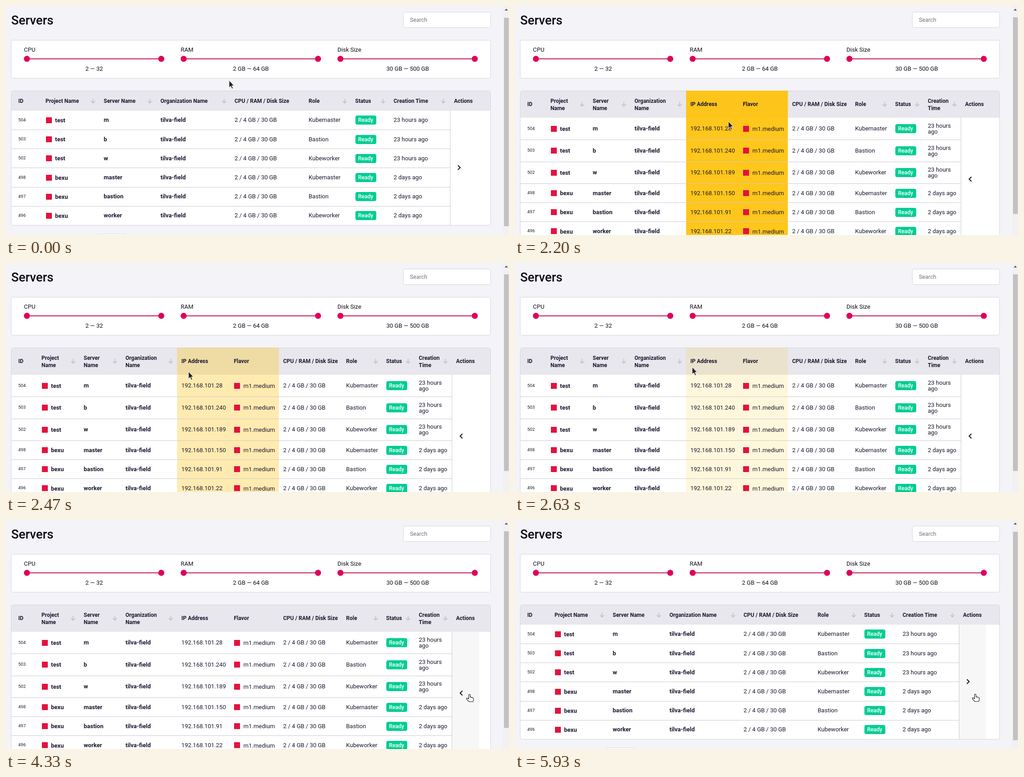
Write an HTML page that moves like this. It is 1107 px wide and 506 px high and loops after 6.26 s.

```html
<!DOCTYPE html>
<html lang="en">
<head>
<meta charset="utf-8">
<title>Servers</title>
<style>
html, body { margin: 0; width: 100%; height: 100%; overflow: hidden; background: #f3f3f8; }
svg { display: block; font: 13px Roboto, sans-serif; fill: #1c1730; }
.b { font-weight: 700; }
.h { font-weight: 700; font-size: 12px; }
.id { font-size: 9.75px; }
.pill { font-weight: 500; font-size: 12px; fill: #fff; }
.title { font-weight: 500; font-size: 27.4px; fill: #0b0812; }
.label { fill: #100d18; }
.search { font-size: 12.4px; fill: #74747c; }
</style>
</head>
<body>
<svg id="stage" width="1107" height="506" viewBox="0 0 1107 506"></svg>
<script>
const LOOP = 6260, OPEN = 1600, CLOSE = 4900;
const EDGE = "#d5d5de", RULE = "#cbcbd3", PINK = "#e0005b";

const rect = (x, y, w, h, fill, extra = "") =>
  `<rect x="${x}" y="${y}" width="${w}" height="${h}" fill="${fill}" ${extra}/>`;
const box = (x, y, w, h, fill = "#fff") => rect(x, y, w, h, fill, `rx="4" stroke="${EDGE}"`);
const path = (d, stroke, width = 1) =>
  `<path d="${d}" fill="none" stroke="${stroke}" stroke-width="${width}"/>`;
// Baselines sit on whole pixels to keep the glyphs crisp
const text = (x, y, s, cls = "", extra = "") =>
  `<text x="${x - .5}" y="${Math.round(y)}" class="${cls}" ${extra}>${s}</text>`;
const icon = (x, y) => rect(Math.round(x), Math.round(y - 6.5), 13, 13, "#e3123f");

const servers = [
  [504, "test", "m", "Kubemaster", "23 hours ago", 28],
  [503, "test", "b", "Bastion", "23 hours ago", 240],
  [502, "test", "w", "Kubeworker", "23 hours ago", 189],
  [498, "bexu", "master", "Kubemaster", "2 days ago", 150],
  [497, "bexu", "bastion", "Bastion", "2 days ago", 91],
  [496, "bexu", "worker", "Kubeworker", "2 days ago", 22],
];

function slider(x, name, range) {
  const dot = cx => `<circle cx="${cx}" cy="116.8" r="6.7" fill="${PINK}"/>`;
  return text(x, 101, name, "label") + path(`M${x + 6} 116.7h296`, "#c5124f", 2) +
    dot(x + 6) + dot(x + 301.7) + text(x + 154.5, 143, range, "label", 'text-anchor="middle"');
}

// Column x positions plus header and row geometry for both table states
const narrow = {
  rows: [231.3, 273.5, 315.7, 357.9, 400.1, 442.3, 484.5], headY: 210, rule: 977, chevron: [997, 357, 1],
  x: { ID: 27.5, "Project Name": 87.5, "Server Name": 215.5, "Organization Name": 340.5,
    "CPU / RAM / Disk Size": 503.5, Role: 666.5, Status: 769, "Creation Time": 853.5, Actions: 986.5 },
  arrows: [191.5, 316.5, 480, 745.5, 830, 962.5],
};
const wide = {
  rows: [247, 295.5, 344, 392.5, 434.7, 476.9, 519], headY: 217, rule: 981.5, chevron: [1002, 382.5, -1],
  x: { ID: 27.5, "Project Name": 78.5, "Server Name": 171.5, "Organization Name": 263.5,
    "IP Address": 386.5, Flavor: 502, "CPU / RAM / Disk Size": 610.5, Role: 749, Status: 837,
    "Creation Time": 909, Actions: 991 },
  arrows: [147.5, 239.5, 362.5, 813.5, 885, 967],
};

function table(t, id) {
  const { rows, x, headY, rule } = t, isWide = t === wide, bottom = rows[6];
  let s = box(11.5, 187.5, 1055, bottom - 187.5) +
    `<path d="M12 ${rows[0]}V192a4 4 0 0 1 4-4H1062a4 4 0 0 1 4 4V${rows[0]}z" fill="#e7e7ed"/>` +
    rect(rule, rows[0], 59.5, bottom - rows[0] - .5, "#f7f7f7", `id="${id}Hover"`);
  if (isWide) s += rect(376.5, 187, 224, 319, "#ffc107", 'id="glow"');
  for (const y of rows.slice(1, 6)) s += path(`M12 ${Math.floor(y) + .5}H${rule}`, RULE);
  s += path(`M${Math.floor(rule) + .5} ${rows[0]}V${bottom}`, RULE);

  for (const name in x) {
    const cut = name.endsWith("Name") || name.endsWith("Time") ? name.split(" ") : [];
    s += isWide && cut.length
      ? text(x[name], 214, cut[0], "h") + text(x[name], 230, cut[1], "h")
      : text(x[name], headY + 4, name, "h");
  }
  for (const a of t.arrows)
    s += path(`M${a} ${headY - 5}v9.5m-4.5-4.5l4.5 4.5l4.5-4.5`, "#bcbcc6", 1.5);

  servers.forEach(([num, project, server, role, age, ip], i) => {
    const c = (rows[i] + rows[i + 1]) / 2, y = c + 4;
    const px = x["Project Name"], sx = x.Status, ax = x["Creation Time"];
    s += text(x.ID, c + 2.5, num, "id") + icon(px, c) + text(px + 21, y + .6, project, "b") +
      text(x["Server Name"], y, server, "b") +
      text(x["Organization Name"], y, "tilva-field", "b") +
      text(x["CPU / RAM / Disk Size"], y, "2 / 4 GB / 30 GB") + text(x.Role, y, role) +
      rect(sx, Math.round(c - 10), 46, 20, "#00cd93", 'rx="4"') + text(sx + 6.5, y, "Ready", "pill");
    s += isWide && i < 3
      ? text(ax, c - 2.2, "23 hours") + text(ax, c + 10.8, "ago")
      : text(ax, y, age);
    if (isWide) s += text(x["IP Address"], y, "192.168.101." + ip) +
      icon(x.Flavor, c) + text(x.Flavor + 21, y + .6, "m1.medium");
  });

  const [cx, cy, d] = t.chevron;
  s += path(`M${cx - 2.5 * d} ${cy - 5}l${5 * d} 5l${-5 * d} 5`, "#171226", 2);
  return `<g id="${id}">${s}</g>`;
}

const stage = document.getElementById("stage");
stage.innerHTML = rect(0, 0, 1107, 506, "#f3f3f8") +
  text(12, 41, "Servers", "title") +
  box(874.5, 13.5, 192, 34) + text(889.5, 35, "Search", "search") +
  box(11.5, 75.5, 1055, 84) +
  slider(40, "CPU", "2 — 32") + slider(385, "RAM", "2 GB — 64 GB") + slider(730, "Disk Size", "30 GB — 500 GB") +
  box(200.5, 503.5, 62, 34) +
  table(narrow, "narrow") + table(wide, "wide") +
  rect(1094, 0, 13, 506, "#f1f1f3") + '<path d="M1097.5 10l3.500-4l3.500 4z" fill="#505050"/>' +
  rect(1096, 25, 10.5, 461, "#c1c1c1", 'id="thumb"') +
  `<path id="arrow" fill="#222" stroke="#fff" stroke-width=".9"
    d="M0 0V15.8L3.6 12.4L6.2 18.4L8.7 17.3L6.1 11.5H10.8Z"/>
  <path id="hand" fill="#fff" stroke="#222" stroke-width="1.2" stroke-linejoin="round"
    d="M-1.6 9V1.4a1.6 1.6 0 0 1 3.2 0V6q1.5-1 2.5.6q1.6-.9 2.4.7q2.3-.3 2.2 1.9v3.3q-.4 2-1.4 3.5H-1.2q-2.5-3-5.3-6.200q-.5-1.7 1.1-2q1.6 0 3.8 2.2z"/>`;

const el = id => document.getElementById(id);
const show = (id, on) => el(id).style.display = on ? "" : "none";

// Pointer tip: time, x, y
const track = [
  [0, 491, 164.5], [680, 491, 164.5], [1300, 1006, 342], [1400, 1006, 338.5], [1980, 1006, 338.5],
  [2200, 470, 255], [2330, 412, 249], [2630, 390, 230], [3230, 556, 281], [3330, 557, 281],
  [3700, 557, 281], [4330, 1020, 385.5], [4430, 1023, 387], [4630, 1019, 386],
  [5200, 1019, 386], [5330, 1013, 385], [LOOP, 1013, 385],
];

function pointer(t) {
  const i = track.findIndex(p => p[0] > t), [t0, x0, y0] = track[i - 1], [t1, x1, y1] = track[i];
  let u = (t - t0) / (t1 - t0);
  if (t1 - t0 > 300) u = u * u * (3 - 2 * u);
  return [x0 + (x1 - x0) * u, y0 + (y1 - y0) * u];
}

function draw(now) {
  const t = now % LOOP, open = t >= OPEN && t < CLOSE;
  const [x, y] = pointer(t), left = open ? wide.rule : narrow.rule;
  const over = x > left && x < left + 59 && y > 247;
  show("narrow", !open);
  show("wide", open);
  show("narrowHover", over);
  show("wideHover", over);
  show("arrow", !over);
  show("hand", over);
  for (const id of ["arrow", "hand"]) el(id).setAttribute("transform", `translate(${x} ${y})`);
  const fade = Math.min(1, Math.max(0, (t - 2200) / 1030));
  el("glow").setAttribute("opacity", .92 * (1 - fade) ** 3.5);
  el("thumb").setAttribute("y", open ? 25 : 26);
  el("thumb").setAttribute("height", open ? 434.5 : 460.5);
}

const start = performance.now();
(function tick() {
  draw(performance.now() - start);
  requestAnimationFrame(tick);
})();
</script>
</body>
</html>
```
